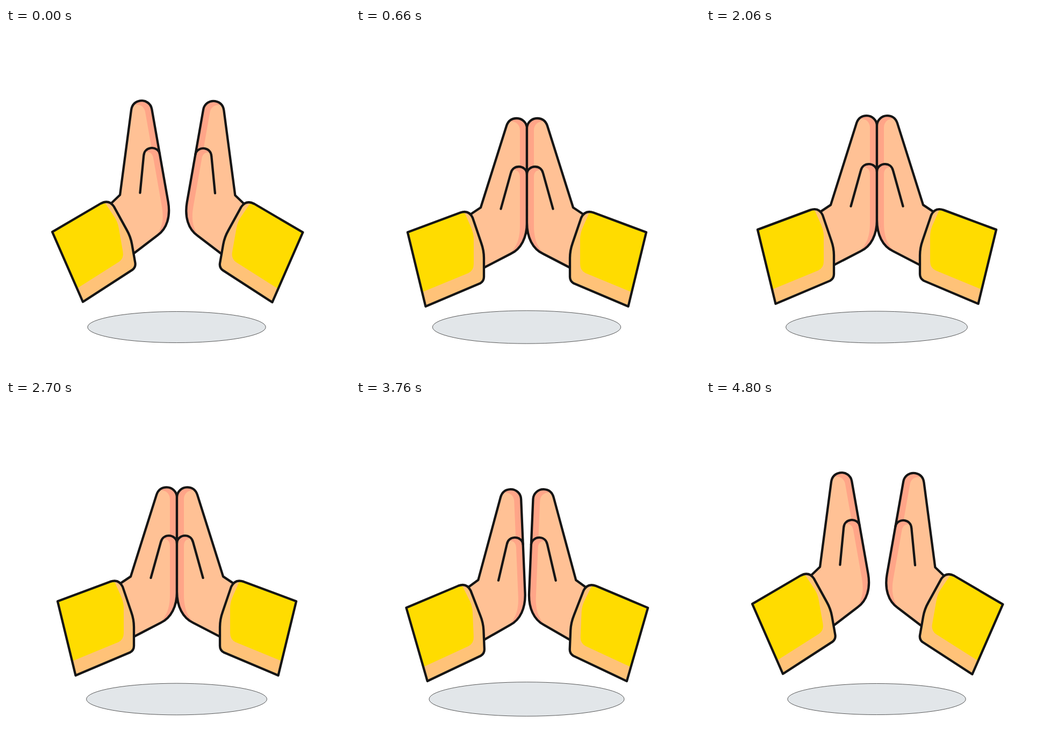
Animation of 640 by 640 pixels, one loop 4.82 s. Source, as an HTML page:

```html
<!DOCTYPE html>
<html lang="en">
<head>
<meta charset="utf-8">
<title>Folding hands</title>
<style>
  html, body { margin: 0; width: 100%; height: 100%; overflow: hidden; background: #fff; }
  svg { display: block; width: 100vw; height: 100vh; }
  .line { fill: none; stroke: #151515; stroke-width: 4.3; stroke-linecap: round; stroke-linejoin: round; }
  .skin { fill: #ffc195; }
  .blush { fill: #ffa588; }
  .cuff { fill: #ffc278; }
  .sleeve { fill: #ffdc00; }
</style>
</head>
<body>
<svg viewBox="0 0 640 640">
  <defs>
    <path id="palm" d="M205 352 L232 334 L280 182 C283 173 290 168 299 168 C309.500 168 318 176.500 318 187 V362 C318 390 307 411 288 420 L232 449 Z"/>
    <path id="wrap" d="M96 380 L194 343.500 Q210 338 217 353 L233 400 Q238 414 238 428 V463 Q238 471 231 475 L129.500 518 Z"/>
    <g id="hand">
      <use href="#palm" class="skin"/>
      <path class="blush" d="M284 174 C288 170 293 168 299 168 C309.500 168 318 176.500 318 187 V272 H305 V190 C305 179 296 172 284 174 Z"/>
      <path class="skin" d="M288 270 C290 262 296 258 303 258 C311 258 318 264 318 272 V300 H280 Z"/>
      <path class="blush" d="M291 264 C294 260 298 258 303 258 C311 258 318 264 318 272 V362 C318 390 307 411 288 420 L284 422 C298 409 305 394 305 368 V277 C305 268 300 263 291 264 Z"/>
      <use href="#palm" class="line"/>
      <path class="line" d="M269.500 336.500 L288 270 C290 262 296 258 303 258 C311 258 318 264 318 272"/>
      <use href="#wrap" class="cuff"/>
      <path class="sleeve" d="M96 380 L194 343.500 Q200 342 203 346 L215 373 Q219 383 219 393 V439 Q219 451 209 456 L124 491 Z"/>
      <use href="#wrap" class="line"/>
    </g>
  </defs>
  <ellipse id="shadow" cx="317.500" cy="556.500" fill="#e2e6e9" stroke="#151515" stroke-width=".7"/>
  <use id="left" href="#hand"/>
  <g transform="translate(636 0) scale(-1 1)"><use id="right" href="#hand"/></g>
</svg>
<script>
  const LOOP = 4820, BOB = LOOP / 2, TURN = LOOP / 8, OPEN_AT = LOOP * 3 / 4;
  const ANGLE = 10;
  const [shadow, left, right] = ['shadow', 'left', 'right'].map(id => document.getElementById(id));
  const clamp = v => Math.min(1, Math.max(0, v));

  // 1 = hands apart, 0 = palms together
  const openness = t => t < BOB ? 1 - clamp(t / TURN) : clamp((t - OPEN_AT) / TURN);

  function pose(el, y, angle, px, py) {
    el.setAttribute('transform', `translate(0 ${y}) rotate(${-angle} ${px} ${py})`);
  }

  function draw(t) {
    const wave = Math.cos(2 * Math.PI * t / BOB);
    const y = -6.4 * (wave + 0.149);
    const angle = ANGLE * openness(t);
    const rx = 173.9 - 8.2 * wave;
    pose(left, y, angle, 130, 440);
    pose(right, y, angle, 133, 454);
    shadow.setAttribute('rx', rx);
    shadow.setAttribute('ry', rx * 0.175);
  }

  const start = performance.now();
  function tick() {
    draw((performance.now() - start) % LOOP);
    requestAnimationFrame(tick);
  }
  tick();
</script>
</body>
</html>
```
